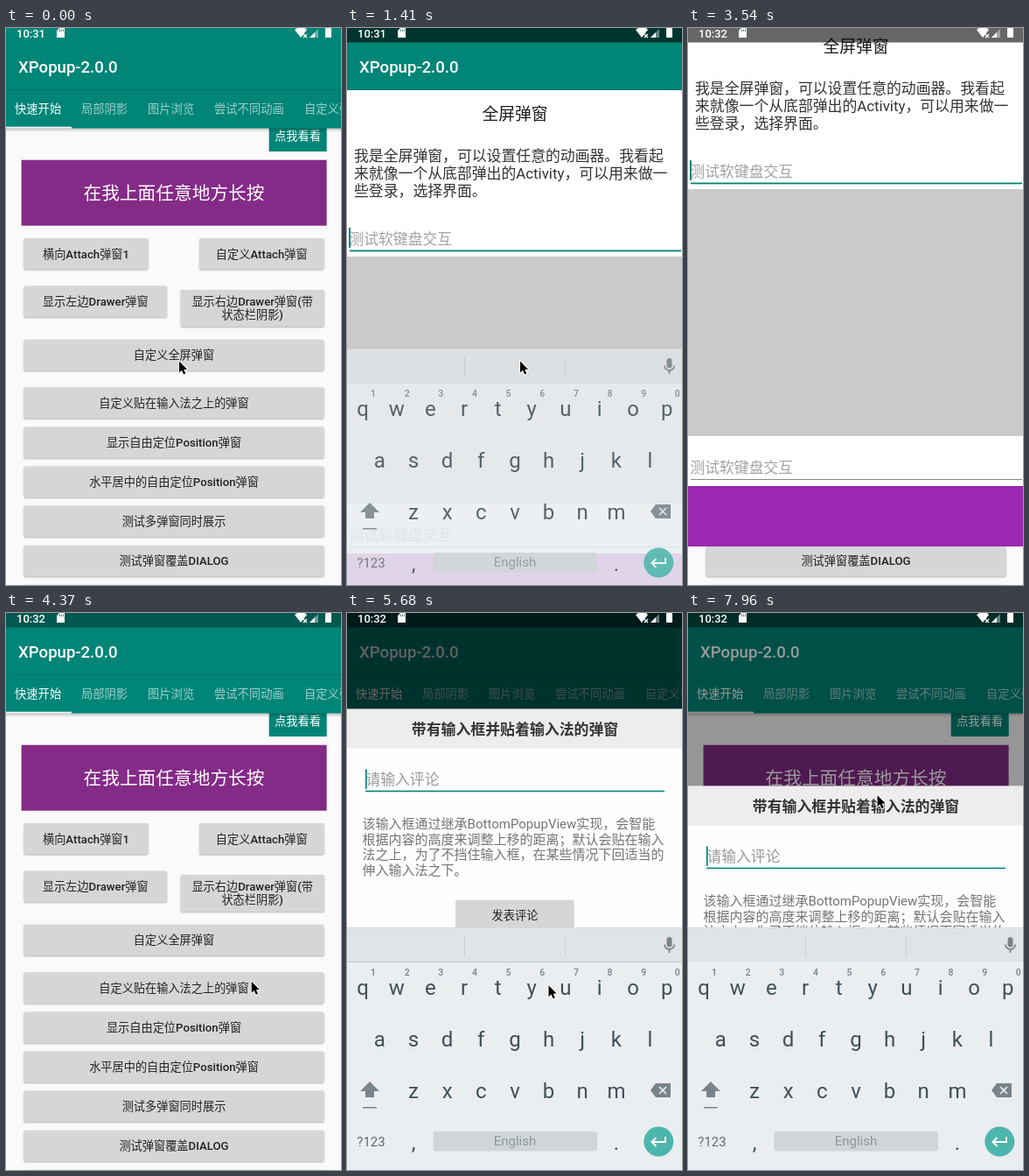
An HTML page with a canvas that plays this animation: 383 px wide and 636 px high, repeating every 8000 ms.

```html
<!DOCTYPE html>
<html lang="zh-CN">
<head>
<meta charset="utf-8">
<style>
html, body { margin: 0; width: 100%; height: 100%; overflow: hidden; background: #fafafa; }
canvas { display: block; width: 383px; height: 636px; }
</style>
</head>
<body>
<canvas id="stage"></canvas>
<script>
const W = 383, H = 636, MID = 192, LOOP = 8000;
const TEAL = '#008577', GREY = '#d5d7d6', KEY = '#414f56', ICON = '#78848a';
const FONT = 'Roboto, "Noto Sans CJK SC", "Noto Sans CJK JP", sans-serif';
const canvas = document.getElementById('stage');
const c = canvas.getContext('2d');
const dpr = window.devicePixelRatio || 1;
canvas.width = W * dpr;
canvas.height = H * dpr;

const ramp = (n, from, to) => Math.min(1, Math.max(0, (n - from) / (to - from)));
const easeOut = (p, power) => 1 - (1 - p) ** power;
const black = alpha => `rgba(0,0,0,${alpha})`;
// Carets stay lit until `first`, then toggle every four steps.
const caretOn = (n, first) => n < first || Math.floor((n - first) / 4) % 2 === 1;

function rect(x, y, w, h, color) {
  c.fillStyle = color;
  c.fillRect(x, y, w, h);
}

function round(x, y, w, h, r, color) {
  c.fillStyle = color;
  c.beginPath();
  c.roundRect(x, y, w, h, r);
  c.fill();
}

function path(points) {
  c.beginPath();
  points.forEach(([x, y]) => c.lineTo(x, y));
}

function poly(points, color) {
  path(points);
  c.fillStyle = color;
  c.fill();
}

function line(points, color, width) {
  path(points);
  c.strokeStyle = color;
  c.lineWidth = width;
  c.stroke();
}

function cross(x, y, r, color, width) {
  line([[x - r, y - r], [x + r, y + r]], color, width);
  line([[x + r, y - r], [x - r, y + r]], color, width);
}

// y is the visual middle of the line.
function text(s, x, y, size, color, align = 'left', weight = 400) {
  c.font = `${weight} ${size}px ${FONT}`;
  c.textAlign = align;
  c.fillStyle = color;
  c.fillText(s, x, y + size * 0.36);
}

// Centred label whose Latin runs are medium and whose Chinese runs are regular.
function label(s, x, y, size, color) {
  const runs = (s.match(/[\x20-\x7e]+|[^\x20-\x7e]+/g) || []).map(run => {
    const weight = run.charCodeAt(0) < 127 ? 500 : 400;
    c.font = `${weight} ${size}px ${FONT}`;
    return { run, weight, width: c.measureText(run).width };
  });
  let left = x - runs.reduce((sum, r) => sum + r.width, 0) / 2;
  for (const { run, weight, width } of runs) {
    text(run, left, y, size, color, 'left', weight);
    left += width;
  }
}

function button(x, y, w, h, caption, press = 0) {
  c.save();
  c.shadowColor = black(0.28);
  c.shadowBlur = (2 + press * 20) * dpr;
  c.shadowOffsetY = (1 + press * 6) * dpr;
  round(x, y, w, h, 2, GREY);
  c.restore();
  if (press) round(x, y, w, h, 2, black(press));
  const lines = caption.split('\n');
  const top = y + h / 2 - (lines.length - 1) * 7.5;
  lines.forEach((s, i) => label(s, x + w / 2, top + i * 15, 13.2, '#222'));
}

const pressAt = (n, start) => n >= start && n < start + 3 ? 0.11 * ramp(n, start - 1.5, start + 1) : 0;

function page(n) {
  rect(0, 0, W, H, '#fafafa');
  rect(300.7, 100, 66, 41, TEAL);
  text('点我看看', 333.5, 123, 13.2, '#fff', 'center');
  rect(17.6, 150.7, 349, 75, '#842a87');
  text('在我上面任意地方长按', MID, 188.5, 20.7, '#fff', 'center');

  const x = 20.5, w = 343, h = 35.5;
  button(x, 240, 142, h, '横向Attach弹窗1');
  button(221, 240, 142.5, h, '自定义Attach弹窗');
  button(x, 294.5, 163.5, h, '显示左边Drawer弹窗');
  button(199.7, 299, 164, 42, '显示右边Drawer弹窗(带\n状态栏阴影)');
  button(x, 355.7, w, h, '自定义全屏弹窗', pressAt(n, 7));
  const rows = ['自定义贴在输入法之上的弹窗', '显示自由定位Position弹窗', '水平居中的自由定位Position弹窗',
    '测试多弹窗同时展示', '测试弹窗覆盖DIALOG', ''];
  rows.forEach((s, i) => button(x, 410.3 + i * 45.1, w, h, s, i ? 0 : pressAt(n, 43)));

  const shade = c.createLinearGradient(0, 114, 0, 119);
  shade.addColorStop(0, black(0.25));
  shade.addColorStop(1, black(0));
  rect(0, 114, W, 5, shade);
  rect(0, 0, W, 114.5, TEAL);
  rect(0, 70, W, 1, black(0.12));
  text('XPopup-2.0.0', 14, 44.5, 18.6, '#fff', 'left', 500);
  let left = 10;
  for (const tab of ['快速开始', '局部阴影', '图片浏览', '尝试不同动画', '自定义弹窗']) {
    text(tab, left, 92, 13.3, left > 10 ? 'rgba(255,255,255,.62)' : '#fff');
    left += tab.length * 13.5 + 22;
  }
  rect(0, 112.7, 75, 2, '#f4f4f4');
}

function statusBar(n) {
  const tint = n >= 46 ? 0.45 : n >= 10 ? 0.6 * (1 - ramp(n, 35.5, 39)) : 0;
  rect(0, 0, W, 16.5, black(tint));
  const white = '#fff';
  text(n < 17 ? '10:31' : '10:32', 12, 6, 13, white, 'left', 500);
  poly([[58, 3], [61, 0], [67, 0], [67, 11], [58, 11]], white);
  for (let i = 0; i < 3; i++) rect(61 + i * 2, 1.5, 1, 2.5, 'rgba(0,80,70,.7)');
  poly([[330, 2], [333, 0], [342, 0], [344, 2], [337, 11]], white);
  cross(342, 9, 2, white, 1.2);
  poly([[347, 11], [357, 1], [357, 11]], 'rgba(255,255,255,.4)');
  poly([[347, 11], [353, 5], [353, 11]], white);
  round(365, 0, 7, 11, 1, white);
}

function fullPopup(n) {
  if (n < 10 || n > 36) return;
  const slide = n < 34 ? 642 * Math.exp(-0.9025 * (n - 9.65)) : 600 * ((n - 33) / 3.5) ** 2;
  c.save();
  c.translate(0, Math.round(slide - 6));
  rect(0, 0, W, 598, '#fff');
  text('全屏弹窗', MID, 27, 18.8, '#1c1c1c', 'center');
  ['我是全屏弹窗，可以设置任意的动画器。我看起', '来就像一个从底部弹出的Activity，可以用来做一', '些登录，选择界面。']
    .forEach((s, i) => text(s, 8, 75 + i * 20, 16.85, '#333'));
  text('测试软键盘交互', 2.5, 169.5, 16.8, '#a2a2a2');
  rect(3, 182.5, 379, 1.8, TEAL);
  if (caretOn(n, 18)) rect(2, 157, 2, 23, TEAL);
  rect(0, 190, W, 282, '#cacaca');
  text('测试软键盘交互', 2.5, 508, 16.8, '#a2a2a2');
  rect(3, 521, 379, 1, '#8a8a8a');
  rect(0, 529, W, 69, '#9c27b0');
  c.restore();
}

// Slides up to rest, then follows the dragging pointer down and slightly back.
function sheetTop(n) {
  const drag = 100.5 * Math.sin(Math.PI / 2 * Math.max(0, n - 62) / 4.2);
  return 101.6 + 368 * Math.exp(-1.91 * (n - 46)) + drag;
}

function bottomPopup(n) {
  if (n < 46) return;
  const top = sheetTop(n);
  const dim = n < 48 ? 0.2 + (n - 46) * 0.26 : 0.62 - 0.22 * ramp(top, 110, 198);
  rect(0, 0, W, H, black(dim));
  c.save();
  c.translate(0, top);
  rect(0, 0, W, 264, '#fefefe');
  rect(0, 0, W, 45, '#ededed');
  text('带有输入框并贴着输入法的弹窗', MID, 22.8, 16.9, '#333', 'center', 700);
  text('请输入评论', 21.5, 80.7, 16.8, '#9a9a9a');
  rect(21, 93, 342, 1.6, TEAL);
  if (caretOn(n, 52)) rect(21, 68.7, 1.7, 22.5, TEAL);
  ['该输入框通过继承BottomPopupView实现，会智能', '根据内容的高度来调整上移的距离；默认会贴在输入',
    '法之上，为了不挡住输入框，在某些情况下回适当的', '伸入输入法之下。']
    .forEach((s, i) => text(s, 17.6, 131.2 + i * 17.6, 15, '#747474'));
  button(124.7, 218, 134.5, 35.5, '发表评论');
  c.restore();
}

function keyRow(keys, x, y, size = 24, color = KEY, weight = 400) {
  [...keys].forEach((k, i) => text(k, x + i * 38.65, y, size, color, 'center', weight));
}

function keyboard(n) {
  const shown = n < 40 ? easeOut(ramp(n, 10, 14), 3) * (1 - ramp(n, 25, 28)) : easeOut(ramp(n, 45, 48), 3);
  if (!shown) return;
  c.save();
  c.globalAlpha = shown;
  c.translate(0, Math.round((1 - shown) * 56));
  rect(0, 359, W, 1, '#d3d7d9');
  rect(0, 360, W, 38.5, '#e0e4e7');
  rect(0, 398.5, W, H - 398.5, '#eaeef1');
  rect(134, 368, 1, 23, '#c6cbce');
  rect(249, 368, 1, 23, '#c6cbce');

  // microphone
  round(365.5, 370, 6, 11.5, 3, ICON);
  c.beginPath();
  c.arc(368.5, 378.5, 5.6, 0, Math.PI);
  c.strokeStyle = ICON;
  c.lineWidth = 1.7;
  c.stroke();
  line([[368.5, 384], [368.5, 388]], ICON, 1.7);

  keyRow('qwertyuiop', 18, 427);
  keyRow('1234567890', 30, 410, 10.5, '#778288', 500);
  keyRow('asdfghjkl', 37.3, 486);
  keyRow('zxcvbnm', 76, 545);

  poly([[26, 535], [37, 546], [31, 546], [31, 553], [21, 553], [21, 546], [15, 546]], ICON);
  rect(18, 564, 16, 1.5, ICON);
  poly([[347, 545], [353, 537], [370, 537], [370, 553], [353, 553]], ICON);
  cross(361, 545, 4, '#eaeef1', 1.7);

  text('?123', 27.5, 604, 15, '#5f6b71', 'center');
  text(',', 76, 604, 24, KEY, 'center');
  text('.', 308, 604, 24, KEY, 'center');
  round(98.5, 592, 187.5, 22.5, 3, '#d0d5d8');
  text('English', MID, 603, 15, '#8d979c', 'center');
  round(339.3, 586.5, 34, 34, 17, '#4db6ac');
  line([[364, 598], [364, 604], [349, 604]], '#fff', 2);
  line([[353.5, 599], [348.5, 604], [353.5, 609]], '#fff', 2);
  c.restore();
}

// Each leg: first step, last step, end point.
const legs = [[12, 16, 311, 289], [17, 18, 382, 410], [35, 40, 223, 426], [42, 44, 230, 424.7],
  [48, 52, 235, 273], [52, 61, 216, 111.6]];

function pointer(n) {
  if (n >= 17 && n < 35) return;
  let x = 197.5, y = 380;
  for (const [from, to, endX, endY] of legs) {
    const p = easeOut(ramp(n, from, to), 2);
    x += (endX - x) * p;
    y += (endY - y) * p;
  }
  if (n >= 62) y = sheetTop(n) + 10;
  c.save();
  c.translate(x, y);
  c.lineJoin = 'round';
  path([[0.5, 0.5], [0.5, 13.5], [3.4, 10.8], [5.6, 15.6], [7.8, 14.6], [5.7, 10], [9.6, 9.7]]);
  c.closePath();
  c.lineWidth = 2;
  c.strokeStyle = '#fff';
  c.stroke();
  c.fillStyle = '#000';
  c.fill();
  c.restore();
}

// The screen refreshes in steps of about 118 ms.
function draw(time) {
  const n = Math.min(67, Math.floor((time % LOOP + 24) / 118.4));
  c.setTransform(dpr, 0, 0, dpr, 0, 0);
  for (const layer of [page, fullPopup, bottomPopup, keyboard, statusBar, pointer]) layer(n);
}

let start;
function tick(now) {
  if (start === undefined) start = now;
  draw(now - start);
  requestAnimationFrame(tick);
}
draw(0);
requestAnimationFrame(tick);
</script>
</body>
</html>
```
